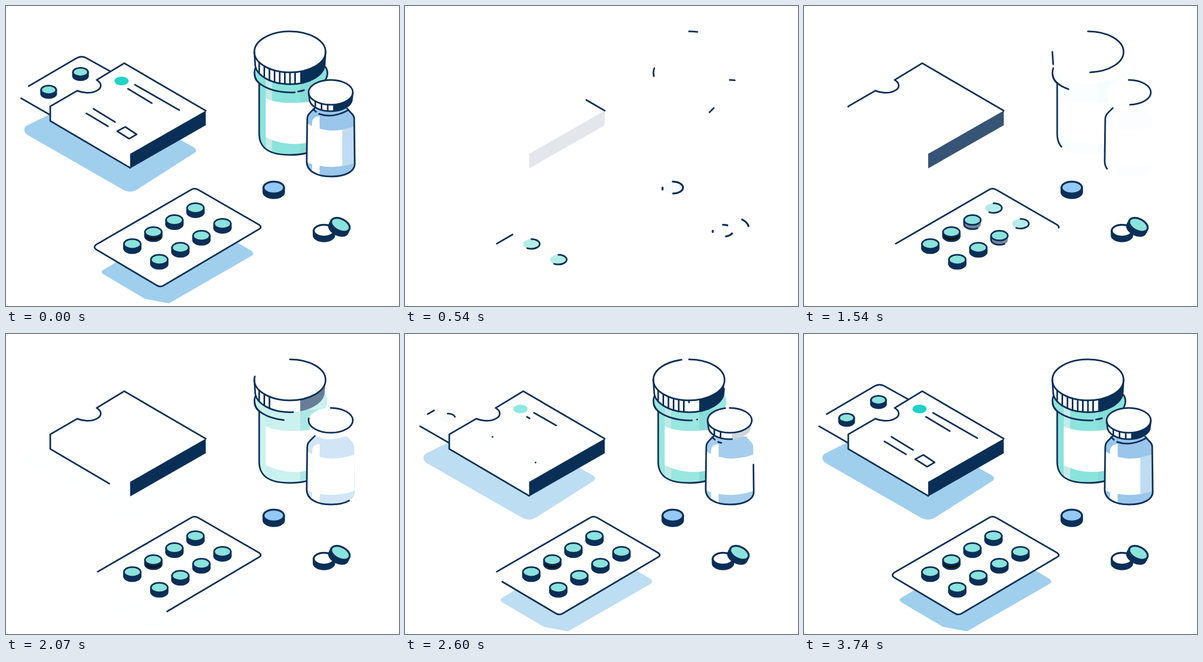
An HTML page that plays this animation: 728 px wide and 556 px high, repeating every 3940 ms.

```html
<!DOCTYPE html>
<html lang="en">
<head>
<meta charset="utf-8">
<title>Medicine line drawing</title>
<style>
  html, body { margin: 0; width: 100%; height: 100%; overflow: hidden; background: #fff; }
  svg { display: block; width: 100vw; height: 100vh; }
</style>
</head>
<body>
<svg id="stage" viewBox="0 0 728 556"></svg>
<script>
const LOOP = 3940, FPS = 15;
const NAVY = '#0a2f57', TEAL = '#8ae3dc', BLUE = '#99c6ea', SHADOW = '#9fcfed';
const stage = document.getElementById('stage');
const parts = [];

// [start, duration] in ms for strokes and fills that share a pace
const OUTLINE = [140, 2830], BOTTLE = [130, 3400], GLASS = [1480, 1300], SHADE = [2060, 780];

function add(d, attrs, parent = stage) {
  const el = document.createElementNS('http://www.w3.org/2000/svg', 'path');
  el.setAttribute('d', d);
  for (const k in attrs) el.setAttribute(k, attrs[k]);
  parent.append(el);
  return el;
}

const cover = (d, parent) => add(d, { fill: '#fff' }, parent);

function fade(d, fill, [start, dur], parent) {
  const el = add(d, { fill }, parent);
  parts.push({ start, dur, set: p => { el.style.opacity = p; } });
}

function draw(d, [start, dur], parent, width = 3) {
  const el = add(d, {
    fill: 'none', stroke: NAVY, 'stroke-width': width, pathLength: 100,
    'stroke-linecap': 'round', 'stroke-linejoin': 'round'
  }, parent);
  parts.push({ start, dur, set: p => {
    const q = (1 - Math.cos(Math.PI * p)) / 2;
    el.style.visibility = p > 0 ? 'visible' : 'hidden';
    el.style.strokeDasharray = p < 1 ? `${q * 100} 300` : 'none';
  } });
}

const ring = (x, y, rx, ry) =>
  `M${x} ${y - ry}a${rx} ${ry} 0 0 1 0 ${2 * ry}a${rx} ${ry} 0 0 1 0 ${-2 * ry}Z`;

function pill({ x, y, rx = 15.5, ry = 9, h = 8, top = TEAL, side = NAVY, start, dur = 485, tilt = 0, width = 3 }) {
  const g = document.createElementNS('http://www.w3.org/2000/svg', 'g');
  g.setAttribute('transform', `translate(${x} ${y}) rotate(${tilt})`);
  stage.append(g);
  const edge = `M${-rx} 0v${h}a${rx} ${ry} 0 0 0 ${2 * rx} 0v${-h}`;
  const wall = `${edge}a${rx} ${ry} 0 0 1 ${-2 * rx} 0Z`;
  const face = ring(0, 0, rx, ry);
  cover(wall, g);
  cover(face, g);
  fade(wall, side, [start + 250 + dur * .25, dur * .85], g);
  fade(face, top, [start + dur * .65 - 180, dur * .45], g);
  draw(edge, [start + 310, dur], g, width);
  draw(face, [start, dur], g, width);
}

function cap({ x, y, rx, ry, h, darkX, dark, side, ribs, gap, first, count }) {
  const bx = rx - 1.5;
  const topY = px => y + ry * Math.sqrt(1 - ((px - x) / rx) ** 2);
  const lowY = px => y + h + ry * Math.sqrt(1 - ((px - x) / bx) ** 2);
  const edge = `M${x - rx} ${y}L${x - bx} ${y + h}A${bx} ${ry} 0 0 0 ${x + bx} ${y + h}L${x + rx} ${y}`;
  cover(edge + 'Z');
  cover(ring(x, y, rx, ry));
  fade(`M${darkX} ${topY(darkX)}A${rx} ${ry} 0 0 0 ${x + rx} ${y}L${x + bx} ${y + h}` +
       `A${bx} ${ry} 0 0 1 ${darkX} ${lowY(darkX)}Z`, NAVY, dark);
  for (let i = 0; i < count; i++) {
    const px = first + i * gap;
    draw(`M${px} ${topY(px)}V${lowY(px)}`, [ribs + i * 165, 150]);
  }
  draw(edge, side);
  draw(ring(x, y, rx, ry), OUTLINE);
}

function carton() {
  fade('M38 222L82 200L300 235L348 262Q356 268 348 273L243 340Q230 348 216 340L40 239Q29 230 38 222Z', SHADOW, SHADE);
  cover('M28 171L41 149L130 97Q140 91 148 96L193 121L170 190L82 202Z');
  draw('M82 202L28 171', [2150, 350]);
  draw('M42 148.500L130 97Q139 91.500 148 96L193 121', [2400, 1100]);
  pill({ x: 79, y: 155.5, rx: 14, ry: 8, h: 7, start: 2450 });
  pill({ x: 138, y: 122.5, rx: 14, ry: 8, h: 7, start: 2600 });

  const body = 'M370 194L219 106L168 137C178 143 178 152 168 157C157 163 142 161 132 157L82 186V213L230 300';
  cover(body + 'L370 221Z');
  fade('M230 274L370 194V221L230 301Z', NAVY, [370, 1420]);
  draw(body, [124, 2380]);
  fade(ring(214, 139, 13, 8), '#1fd3c6', [2200, 800]);
  draw('M239 146L321 193', [2100, 1000]);
  draw('M226 153.500L270 180', [2450, 700]);
  draw('M162 190.500L202 215', [2560, 700]);
  draw('M149 199L189 223', [2650, 700]);
  draw('M242 238L228 246L206 232L221 224Z', [2560, 1000]);
}

function blister() {
  fade('M180 489L202 476L300 420L430 439L455 454Q461 459 455 463L302 551L258 543L180 497Q174 492 180 489Z', SHADOW, SHADE);
  const card = 'M170 440.500L342 341Q349 336 357 341L468 405Q476 410 468 414L292 518Q285 522 278 517L170 453Q158 446.500 170 440.500Z';
  cover(card);
  draw(card, OUTLINE);
  // two rows, appearing pair by pair from the lower left
  for (let i = 3; i >= 0; i--) {
    const start = 260 + i * 333, x = 234 + i * 39, y = 441 - i * 22.2;
    pill({ x, y, start, side: i === 1 ? '#10161f' : NAVY });
    pill({ x: x + 50, y: y + 29, start });
  }
}

function jar() {
  const body = 'M462 115C459 122 459 135 469 143V237C469 264 488 276 526 276C566 276 585 264 585 237V143C596 137 598 122 592 113';
  fade(body + 'Z', TEAL, GLASS);
  fade('M481 136L493 140V270L481 263Z', '#c3ebe8', GLASS);
  fade('M545 140H585V255L545 274Z', '#86dcd6', GLASS);
  cover('M481 171Q515 187 584 174V246Q530 267 481 243Z');
  draw(body, BOTTLE);
  draw('M460.500 126A68 34 0 0 0 535 160', OUTLINE);
  draw('M541 158.500Q547 158 552 156', [2550, 400]);
  cap({ x: 526, y: 85, rx: 66, ry: 38, h: 22, darkX: 545, dark: [1560, 820],
        side: [1151, 1767], ribs: 1570, first: 469, gap: 9.5, count: 8 });
}

function vial() {
  const body = 'M572 189L563 198Q558 203 558 210L557 288C557 306 575 316 602 316C630 316 646 306 646 293L645 208Q644 202 639 198L632 190';
  cover(body + 'Z');
  fade(body + 'Z', BLUE, GLASS);
  cover('M558 217Q572 228 602 231Q630 230 645 223V291Q602 306 557 290Z');
  cover('M567 226V214Q570 204 581 204V231Z');
  cover('M567 291V305L581 312V295Z');
  fade('M623 229L645 223V291L623 297Z', '#bfdcf2', [2650, 650]);
  draw(body, BOTTLE);
  draw('M569 191L574 196', [2400, 150]);
  draw('M580 200Q605 209 634 193', [2450, 700]);
  cap({ x: 601.5, y: 160, rx: 41, ry: 23, h: 12, darkX: 606, dark: [2450, 750],
        side: [2000, 1150], ribs: 2270, first: 573, gap: 11.5, count: 3 });
}

function loosePills() {
  const big = { rx: 19, ry: 11, h: 8.5, dur: 915, width: 3.5 };
  pill({ ...big, x: 496, y: 336.5, top: '#94c8f5', start: 80 });
  pill({ ...big, x: 589, y: 416.5, top: '#fff', start: 110 });
  pill({ ...big, x: 619.5, y: 405.5, rx: 18.5, tilt: 27, start: 276 });
}

carton();
blister();
jar();
vial();
loosePills();

function render(now) {
  const step = Math.floor((now % LOOP) * FPS / 1000);
  // the loop opens on the finished picture, then starts over from blank
  const t = step === 0 ? LOOP : step * 1000 / FPS;
  for (const { start, dur, set } of parts) set(Math.min(1, Math.max(0, (t - start) / dur)));
}

const began = performance.now();
function tick() {
  render(performance.now() - began);
  requestAnimationFrame(tick);
}
tick();
</script>
</body>
</html>
```
